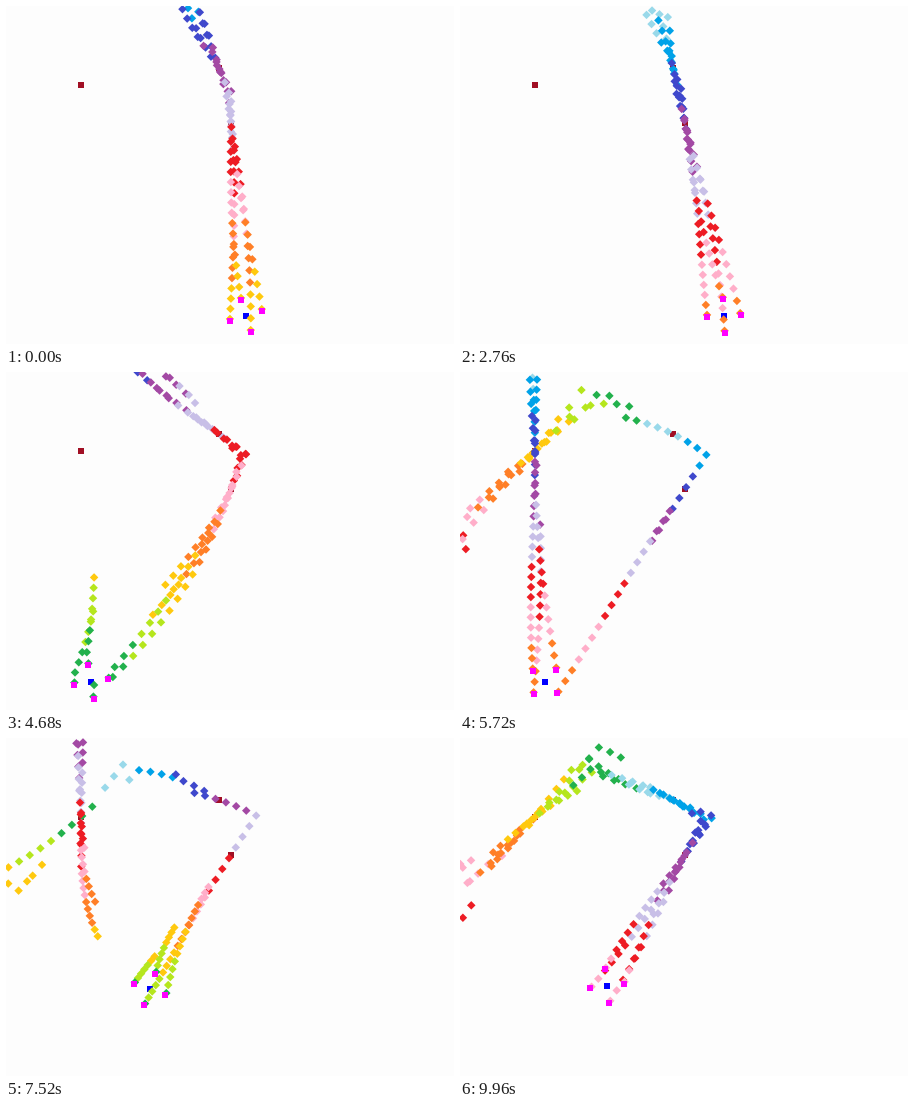
Recreate the animation shown at these times as a matplotlib script. Size 448 px wide and 338 px high, loop 10000 ms.

```python
import numpy as np
import matplotlib.pyplot as plt
from matplotlib.animation import FuncAnimation

W, H, DPI = 448, 338, 100
FRAMES, INTERVAL = 250, 40
WARMUP = 60              # ticks simulated before the loop starts
SPEED = 11.4             # pixels per tick, 30 ticks per second
RADIUS = 16.8
SPIN = 4.56              # degrees per tick
START_ANGLE = -17
MUZZLE = 2               # shots appear slightly ahead of their gun

TARGETS = np.array([(225, 117), (213, 62), (75, 79)], float)
PALETTE = np.array([
    (237, 28, 36), (255, 174, 201), (255, 127, 39), (255, 201, 14),
    (181, 230, 29), (34, 177, 76), (153, 217, 234), (0, 162, 232),
    (63, 72, 204), (163, 73, 164), (200, 191, 231)]) / 255

# Ship route: tick, x, y
ROUTE = np.array([
    (50, 240, 310), (57, 264, 310), (88, 264, 310),
    (139, 85, 310), (208, 85, 310), (226, 147, 248)], float)


def ship_at(tick):
    return np.array([np.interp(tick, ROUTE[:, 0], ROUTE[:, k]) for k in (1, 2)])


def guns_at(tick):
    a = np.radians(START_ANGLE + SPIN * tick + 90 * np.arange(4))
    return ship_at(tick) + RADIUS * np.column_stack([np.cos(a), np.sin(a)])


def nearest(pos):
    gap = pos[:, None] - TARGETS[None]
    return np.argmin((gap ** 2).sum(axis=2), axis=1)


def heading(pos, goal):
    d = TARGETS[goal] - pos
    return d / np.maximum(np.hypot(d[:, 0], d[:, 1]), 1e-6)[:, None]


def simulate(last):
    """Return shot positions and colour indices for each tick from 0 to last."""
    pos, aim = np.empty((0, 2)), np.empty((0, 2))
    goal, hue = np.empty(0, int), np.empty(0, int)
    states = []
    for tick in range(-WARMUP, last + 1):
        # A shot turns only when another target becomes the nearest one.
        closest = nearest(pos)
        turn = closest != goal
        aim[turn] = heading(pos[turn], closest[turn])
        goal = closest
        pos = pos + SPEED * aim

        guns = guns_at(tick)
        new_goal = nearest(guns)
        new_aim = heading(guns, new_goal)
        new_hue = (3 + (tick + 3) // 4) % len(PALETTE)
        pos = np.vstack([pos, guns + MUZZLE * new_aim])
        aim = np.vstack([aim, new_aim])
        goal = np.append(goal, new_goal)
        hue = np.append(hue, np.full(4, new_hue))

        inside = ((pos >= 0) & (pos <= (W, H))).all(axis=1)
        pos, aim, goal, hue = pos[inside], aim[inside], goal[inside], hue[inside]
        if tick >= 0:
            states.append((pos.copy(), hue.copy()))
    return states


def tick_of(frame):
    return frame * 6 // 5


states = simulate(tick_of(FRAMES - 1))

fig = plt.figure(figsize=(W / DPI, H / DPI), dpi=DPI, facecolor="#fdfdfd")
ax = fig.add_axes([0, 0, 1, 1])
ax.set_xlim(0, W)
ax.set_ylim(H, 0)
ax.axis("off")


def dots(points, marker, color, z, size=6):
    points = np.atleast_2d(points)
    return ax.scatter(points[:, 0], points[:, 1], s=(size * 72 / DPI) ** 2,
                      marker=marker, c=[color], linewidths=0, zorder=z)


dots(TARGETS, "s", (0.63, 0.06, 0.14), 1)
ship = dots(ship_at(0), "s", (0, 0, 1), 2, 5.5)
shots = dots(states[0][0], "D", PALETTE[0], 3)
guns = dots(guns_at(0), "s", (1, 0, 1), 4)


def draw(frame):
    tick = tick_of(frame)
    pos, hue = states[tick]
    ship.set_offsets(ship_at(tick)[None])
    guns.set_offsets(guns_at(tick))
    shots.set_offsets(pos)
    shots.set_facecolors(PALETTE[hue])
    return ship, shots, guns


anim = FuncAnimation(fig, draw, frames=FRAMES, interval=INTERVAL,
                     repeat=True, repeat_delay=0, blit=False)
plt.show()
```
